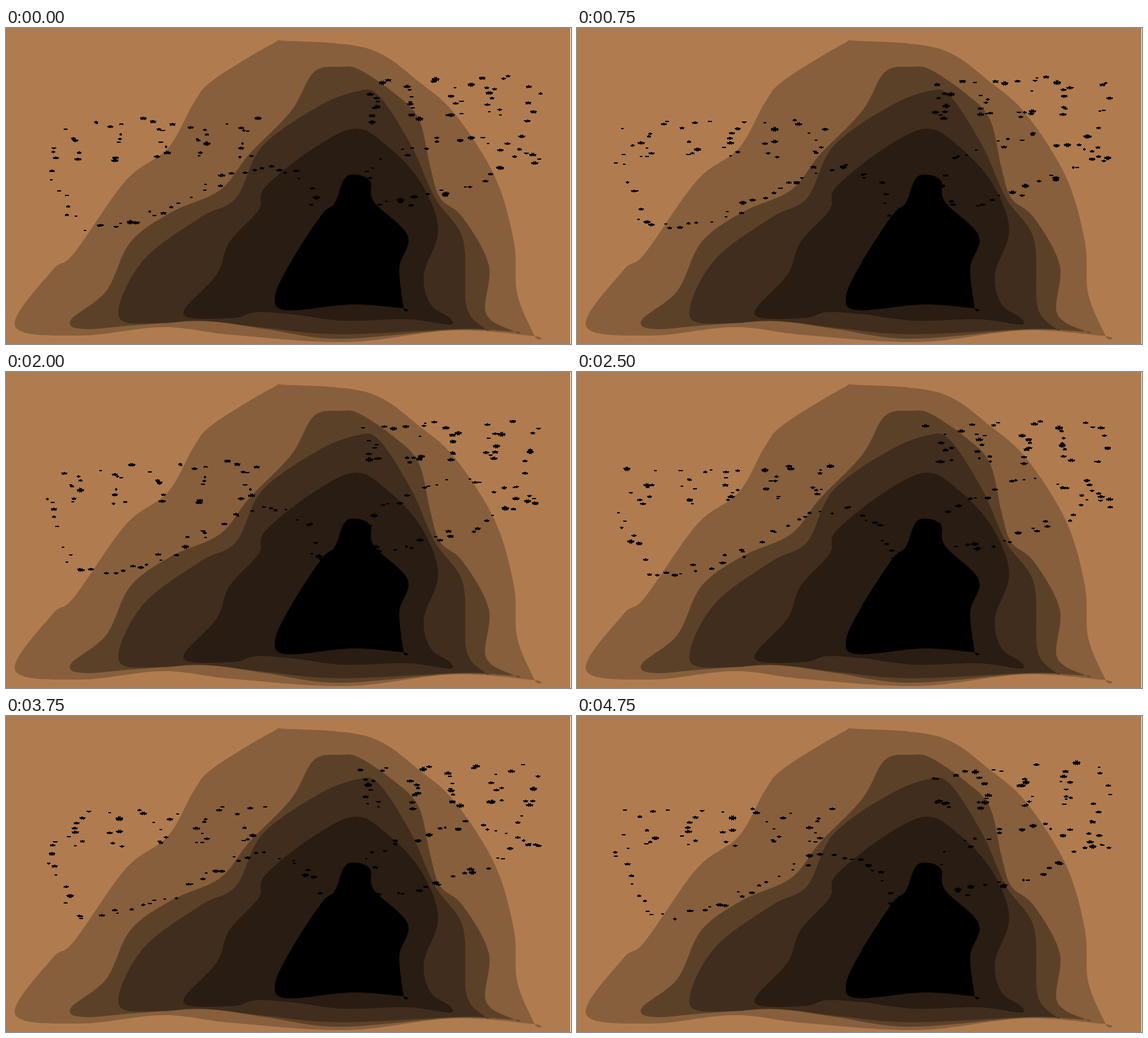
Write an HTML page that moves like this. It is 872 px wide and 487 px high and loops after 5000 ms.

```html
<!DOCTYPE html>
<html lang="en">
<head>
<meta charset="utf-8">
<title>Bats around a cave</title>
<style>
  html, body { margin: 0; width: 100%; height: 100%; overflow: hidden; background: #fff; }
  svg { display: block; width: 871px; height: 487px; background: #b07c4f; }
  #bats { shape-rendering: crispEdges; }
</style>
</head>
<body>
<svg viewBox="0 0 871 487">
  <defs>
    <path id="bat" d="M0 -2 L1.5 -4 L2 -1 L4 -2 L7 0 L5 .8 L4.5 3.5 L2.8 1.8 L1.6 4 L0 2.4 L-1.6 4 L-2.8 1.8 L-4.5 3.5 L-5 .8 L-7 0 L-4 -2 L-2 -1 L-1.5 -4Z"/>
  </defs>
  <g id="cave"></g>
  <g id="bats"></g>
</svg>
<script>
const LOOP = 5000, STEP = 250, TURN = 2 * Math.PI;
const cave = document.getElementById('cave');
const flock = document.getElementById('bats');

function make(tag, attrs, parent) {
  const el = document.createElementNS('http://www.w3.org/2000/svg', tag);
  for (const key in attrs) el.setAttribute(key, attrs[key]);
  if (parent) parent.append(el);
  return el;
}

// Smooth curve through key points; a repeated point makes a corner.
function curve(text, closed) {
  const pts = text.split(' ').map(p => p.split(',').map(Number));
  const n = pts.length;
  const at = i => closed ? pts[(i + n) % n] : pts[Math.max(0, Math.min(n - 1, i))];
  let d = 'M' + pts[0];
  for (let i = 0; i < (closed ? n : n - 1); i++) {
    const [a, b, c, e] = [at(i - 1), at(i), at(i + 1), at(i + 2)];
    const c1 = b.map((v, k) => v + (c[k] - a[k]) / 6);
    const c2 = c.map((v, k) => v - (e[k] - b[k]) / 6);
    d += `C${c1} ${c2} ${c}`;
  }
  return d + (closed ? 'Z' : '');
}

function shade(opacity, points) {
  make('path', { d: curve(points, true), 'fill-opacity': opacity }, cave);
}

// From the outer rock to the opening.
shade(.235, '14,460 70,375 105,347 185,235 250,185 290,115 320,80 410,25 435,20 560,32 640,85 695,135 755,230 784,330 789,410 816,475 816,475 690,466 527,484 350,473 243,461 115,474');
shade(.32, '100,450 155,405 192,330 255,284 330,250 375,195 440,128 475,68 515,60 545,64 600,101 637,140 655,215 670,262 705,292 745,365 741,440 785,468 785,468 690,465 515,479 400,464 310,452 200,458 120,464');
shade(.3, '174,445 210,360 300,292 355,262 395,183 480,122 540,98 575,104 625,180 662,262 705,325 711,430 740,464 740,464 690,464 515,472 400,462 300,451 240,455');
shade(.37, '274,441 325,380 345,330 390,280 400,245 475,185 540,155 590,183 640,238 667,310 645,380 655,425 685,447 684,457 620,449 520,451 440,441 385,438 350,447');
shade(1, '415,415 440,360 487,288 507,270 522,233 540,226 562,236 568,268 620,320 607,370 614,432 614,432 535,426 435,435');

// Routes map progress 0..1 to a position.
function along(points) {
  const path = make('path', { d: curve(points, false) });
  const length = path.getTotalLength();
  return u => path.getPointAtLength(u * length);
}

function curl(x, y, width, drop, rx, ry, turns) {
  const side = Math.sign(width);
  return u => ({
    x: x + width * u + side * rx * Math.sin(TURN * turns * u),
    y: y + drop * u - ry * Math.cos(TURN * turns * u)
  });
}

let seed = 41;
function random() {
  seed = (seed * 1664525 + 1013904223) % 4294967296;
  return seed / 4294967296;
}

const bats = [];
function release(count, route) {
  for (let i = 0; i < count; i++) {
    bats.push({
      route,
      start: (i + random() * 1.6) / count,
      dx: (random() - .5) * 16,
      dy: (random() - .5) * 13,
      size: .35 + random() * .65,
      phase: random() * TURN,
      el: make('use', { href: '#bat' }, flock)
    });
  }
}

release(40, along('484,296 460,235 395,212 315,243 225,290 120,308 90,265 66,215 85,180'));
release(42, curl(75, 174, 325, -6, 20, 26, 5));
release(30, along('572,272 650,262 740,230 795,197 825,203 790,180 808,130 820,100 800,78'));
release(38, curl(785, 104, -250, 8, 18, 28, 4));
release(16, along('562,240 572,212 640,186 703,168 765,183 800,188'));

function pose(step) {
  for (const b of bats) {
    const p = b.route((b.start + step * STEP / LOOP) % 1);
    const flap = .85 + .15 * Math.sin(b.phase + step * TURN / 4);
    const x = Math.round(p.x + b.dx), y = Math.round(p.y + b.dy);
    b.el.setAttribute('transform', `translate(${x} ${y}) scale(${b.size} ${b.size * flap})`);
  }
}

const begin = performance.now();
let shown = -1;
function tick() {
  const step = Math.floor((performance.now() - begin) % LOOP / STEP);
  if (step !== shown) pose(shown = step);
  requestAnimationFrame(tick);
}
tick();
</script>
</body>
</html>
```
